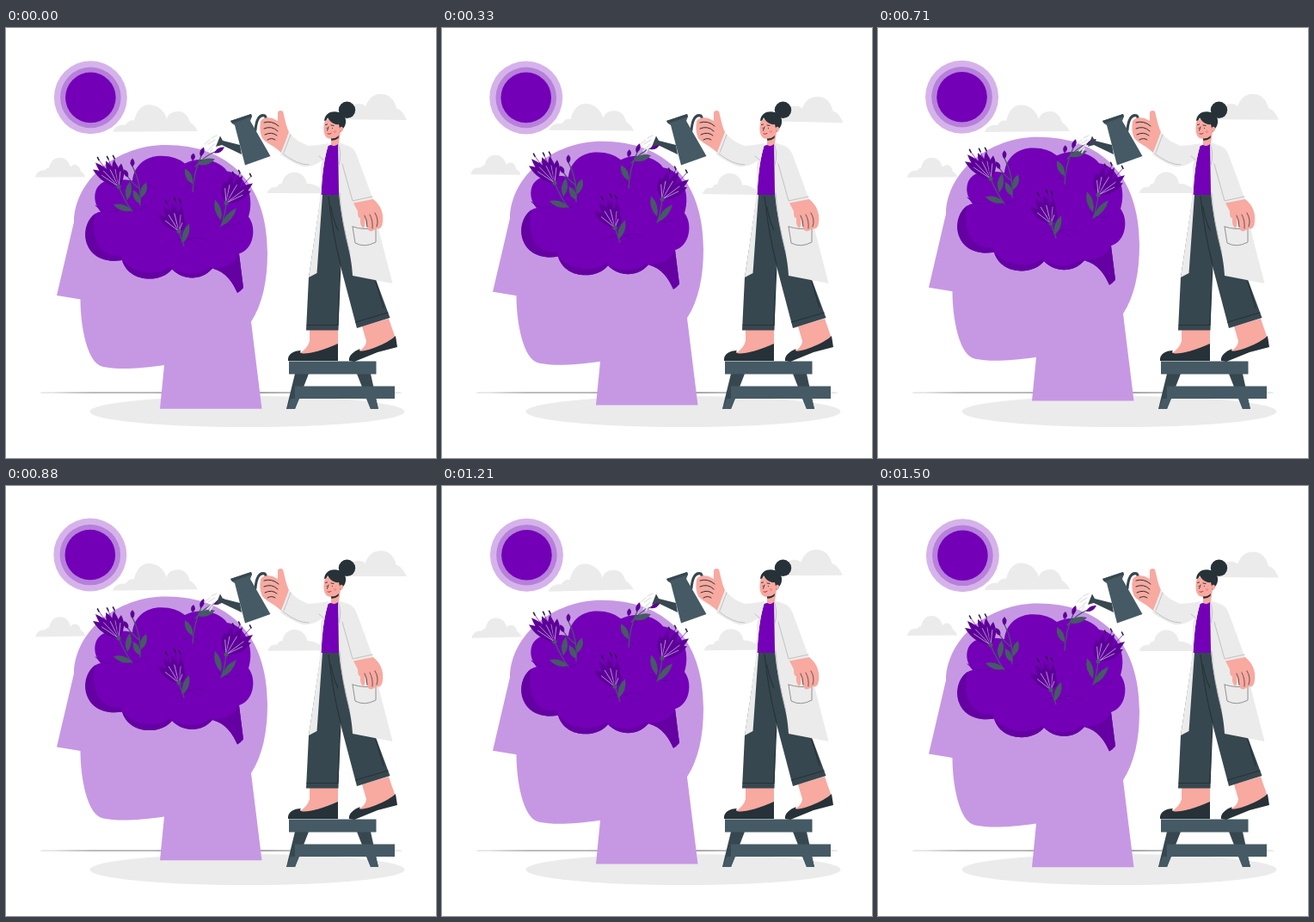
An HTML page for the animation above (1540 ms loop, 500 by 500 pixels).

```html
<!DOCTYPE html>
<html lang="en">
<head>
<meta charset="utf-8">
<title>Growing mind</title>
<style>
  html, body { margin: 0; height: 100%; overflow: hidden; background: #fff; }
  svg { display: block; width: 100%; height: 100%; }
  .line { fill: none; stroke-linecap: round; stroke-linejoin: round; }
</style>
</head>
<body>
<svg viewBox="0 0 500 500">
  <g id="clouds" fill="#ebebeb">
    <path d="M34 174C35 169 39 165 45 166Q48 163 50 163C52 155 56 151 62 151C69 151 73 155 75 162C78 158 85 158 87 167Q91 169 92 173.500Z"/>
    <path d="M124 121C126 115 132 112 139 113C143 107 147 107 149 108C152 96 158 89.500 166 89.500C176 89.500 184 96 187 106C188 100 194 97 200 97C208 97 212 103 214 110C218 112 221 116 223 120Z"/>
    <path d="M304 192C305 187 310 184 315 185C317 181 319 180 321 181C322 173 328 167.500 335 167.500C343 167.500 349 173 350 181C356 180 366 184 371 192Z"/>
    <path d="M390 106C395 95 403 87 411 88Q416 88 418 91C421 82 427 76.500 436 76.500C446 76.500 452 84 454 93C460 95 463 100 466 106.500Z"/>
  </g>
  <ellipse cx="250" cy="424" rx="211" ry=".9" fill="#a6a6a6"/>
  <ellipse cx="280.500" cy="446" rx="183" ry="18" fill="#ebebeb"/>

  <g id="sun">
    <circle r="42.500" fill="#d5b3ea"/>
    <circle r="35.300" fill="#b680db"/>
    <circle r="29.300" fill="#7300b7"/>
  </g>

  <g id="head">
    <path fill="#c698e3" d="M59 311.500L79 226C80 177 129 136.600 186 136.600C258 136.600 304 180 304 262C304 295 298 322 285 342L297.500 443.300H179L184 392.500C150 397.500 128 397.500 113 394.500C94 391 86.500 346 86.500 316Z"/>
    <path fill="#7300b7" d="M110 214C100 203 101 184 115 179Q130 175 147 178C149 160 163 149.300 180 149.300Q197 149 208 158C225 149.500 248 154 257 167C277 169 290 195 282 220C292 233 288 258 271 263L276 302.500Q272 307 269 308.500C264 297 256 284 240 280C228 294.500 206 294.500 193 281C180 297.500 143 297 135 270.500C112 275 92 260 92.500 240C93 226 100 216 110 214Z"/>
    <g fill="#6500a3">
      <path d="M104 216C82 232 90 278 135 270.500L134 265C112 268 97 249 104 216Z"/>
      <path d="M135 270.500C143 297 180 297.500 193 281L192 277C178 290 150 287 135 270.500Z"/>
      <path d="M193 281C206 294.500 228 294.500 240 280L238 278C226 288 208 288 193 281Z"/>
      <path d="M240 280C256 284 264 297 269 308.500Q272 307 276 302.500L271 263Q264 279 240 280Z"/>
    </g>
    <path class="line" stroke="#6500a3" d="M104 207Q115 219 132 212M130 208Q146 221 163 207M206 187Q217 180 226 192M191 250Q211 240 225 253M212 246Q225 241 236 249M243 222Q256 236 272 227"/>
    <g id="plants"></g>
  </g>

  <path class="line" stroke="#e6e6e6" stroke-width="1.500" d="M245 125L239 128M243 130L235 135M242 135L234 143M237 130L231 135M240 140L237 145"/>

  <g id="stool">
    <path fill="#37474f" d="M336 402H352L336 443H326ZM408 402H424L433 443H424Z"/>
    <path fill="#455a64" d="M329 387.500H430.500V402.500H329ZM336 416.500H452V431H336ZM331 431L326 443H336L341 431ZM419 431H430L433 443H424Z"/>
  </g>

  <g id="can">
    <path class="line" stroke="#37474f" stroke-width="3" d="M290 119C291 106 295 100 301 102Q304 106 303 114"/>
    <path fill="#37474f" d="M272 136L252 131L249 125.500L244 138L251 136L274 147Z"/>
    <path fill="#455a64" d="M261 108L285 100L286 103L284 108L307.500 149L278 159.500L266 113L263 111Z"/>
    <path fill="#37474f" d="M261 108L285 100L286 103L263 111Z"/>
  </g>

  <g id="woman">
    <g fill="#f8a9a0">
      <path d="M353 350H386V370Q362 382 340 379Q351 373 353 364Z"/>
      <path d="M414 347L445 338L453 361Q430 378 405 379Q419 372 419 364Z"/>
      <path d="M296 109C297 105 304 103 310 105L316 108L316 98Q318 94.500 322 97C324 104 325 112 329 121L321 146C314 138 302 134 298 128Q294 120 296 109Z"/>
    </g>
    <path class="line" stroke="#263238" d="M300 110Q309 107 317 114M300 117Q309 113 316 120M301 124Q309 120 315 125M304 130Q309 127 313 130"/>
    <path fill="#263238" d="M328 387C327 379 335 375 343 375C337 382 363 378 386 367V387ZM399 387C398 381 404 376 412 373C405 381 440 370 453 358L455 371L432 377L405 388Z"/>
    <path fill="#37474f" d="M367 190L352 290L349 351.500H386.500L388.500 275L408 349L446.500 337L392 190Z"/>
    <path class="line" stroke="#263238" stroke-width="1.200" d="M375 196Q380 240 389 275L386 345M350 345.500H386M406.500 342L444 331M378 208Q380 222 386 235M430 295L439 325"/>

    <path fill="#7300b7" d="M374.500 137L387 133L389 194H366.500Q368 158 374.500 137Z"/>
    <g fill="#ebebeb">
      <path d="M372 138L366 160Q367 190 363 215L352 290L361.500 285L368 194H366.500Q368 158 374.500 137Z"/>
      <path d="M386 133L398 137Q405 139 409 151L427 200L433 233L449.500 297L403 288C402 260 389 225 387 190Z"/>
      <path d="M319 147L329 121C335 129 343 134 352 137Q366 136 375 134L370 152C362 159 352 162 345 161C335 158 326 152 319 147Z"/>
    </g>
    <path class="line" stroke="#bdbdbd" stroke-width=".9" d="M322 146Q338 159 352 159M331 124L323 145M364 149L370 154M386 134Q391 145 387 160M391 158L403 201L426 196M388 192Q390 225 400 262"/>
    <path class="line" stroke="#929292" d="M403 231L406 250Q417 256 430 249L430 233Q416 235 403 231"/>
    <path fill="#f8a9a0" d="M404 203.500L427 199C437 207 440 218 437.500 229Q435 235 431 233L426 236Q421 238 419 229L417 221Q418 232 415 233Q411 228 412 221Q409 222 409 213Z"/>
    <path class="line" stroke="#263238" stroke-width=".7" d="M417 218Q420 223 420 231M423 217Q427 224 426 233M429 215Q434 223 431 231"/>

    <path fill="#f8a9a0" d="M371 107C368 117 369 129 378 129V136Q383 139 387 134L389 121Q393 119 391 113L384 104Z"/>
    <path fill="#263238" d="M370 108C371 98 380 96 387 98C394 100 397 107 394 114Q391 119 389 121L387 112C381 113 376 108 374 104Q373 108 370 108ZM378 128.500Q383 129 387 125L386.500 128Q382 131.500 378 130.500Z"/>
    <ellipse cx="390" cy="117.500" rx="2" ry="2.800" fill="#f8a9a0"/>
    <circle cx="396.500" cy="95.300" r="9.700" fill="#263238"/>
    <path class="line" stroke="#263238" stroke-width=".9" d="M373 116.300V116.500M379.500 116.500V116.700M371.500 112.500L373.500 112M378 113L381 113.500M375 115L373.500 119.300"/>
    <path class="line" stroke="#b5343c" d="M374 123Q376 124 378 122.500"/>
    <circle cx="382.500" cy="120.500" r="1.700" fill="#f28f86"/>
  </g>
</svg>
<script>
const byId = id => document.getElementById(id);
const PETAL = '#5d0098', LEAF = '#455a64', INK = '#2d2340', PALE = '#e3c9f2';

const stroke = (d, color, width = 1) =>
  `<path class="line" d="${d}" stroke="${color}" stroke-width="${width}"/>`;

// Pointed blade between two points, used for leaves, buds and petals.
function blade(x1, y1, x2, y2, width, color) {
  const mx = (x1 + x2) / 2, my = (y1 + y2) / 2;
  const len = Math.hypot(x2 - x1, y2 - y1);
  const nx = (y1 - y2) / len * width, ny = (x2 - x1) / len * width;
  return `<path fill="${color}" d="M${x1} ${y1}Q${mx + nx} ${my + ny} ${x2} ${y2}Q${mx - nx} ${my - ny} ${x1} ${y1}Z"/>`;
}
const leaf = (...p) => blade(...p, 7, LEAF);
const bud = (...p) => blade(...p, 5, PETAL);
const stem = d => stroke(d, LEAF, 1.2);

function flower(x, y, petals, stamens) {
  return petals.map(([px, py]) => blade(x, y, px, py, 9, PETAL)).join('') +
    petals.map(([px, py]) =>
      stroke(`M${x} ${y}L${x + (px - x) * .65} ${y + (py - y) * .65}`, PALE, .7)).join('') +
    stamens.map(([sx, sy]) =>
      stroke(`M${x} ${y}L${sx} ${sy}`, PETAL, .7) +
      stroke(`M${sx} ${sy}l-1.500 -3`, INK, 1.6)).join('') +
    `<circle cx="${x}" cy="${y}" r="2.500" fill="${LEAF}"/>`;
}

byId('plants').innerHTML = [
  stem('M131 185Q138 202 147 214'),
  leaf(141, 201, 144, 179), leaf(147, 213, 125, 206),
  flower(131, 185, [[101, 165], [104, 157], [116, 155], [125, 154], [134, 158]],
    [[108, 154], [119, 153], [126, 152]]),

  stem('M156 207Q158 182 147 161M155 187Q147 182 140 171'),
  leaf(157, 198, 163, 180), leaf(156, 205, 148, 189),
  bud(147, 162, 147, 152), bud(142, 174, 137, 165),

  stem('M217 191Q218 168 228 147M220 162Q231 149 244 144'),
  leaf(217, 182, 208, 164), leaf(222, 159, 243, 153),
  bud(226, 150, 230, 139), bud(242, 146, 254, 139), bud(217, 155, 218, 146),

  stem('M256 203Q255 218 250 231'),
  leaf(250, 224, 243, 200), leaf(250, 231, 268, 210),
  flower(256, 204, [[254, 178], [262, 172], [275, 172], [287, 181], [285, 190]],
    [[265, 171], [272, 169], [285, 173]]),

  stem('M201 237L207 254'),
  leaf(205, 251, 213, 228),
  flower(201, 237, [[177, 218], [183, 208], [193, 205], [204, 208], [207, 222]],
    [[187, 204], [197, 201], [203, 203]])
].join('');

const LOOP = 1540, STEPS = 37;

// Triangle wave: 0 at the ends of the cycle, 1 in the middle.
const triangle = p => 1 - Math.abs(1 - 2 * (p - Math.floor(p)));

function render(now) {
  const step = Math.floor((now % LOOP) * .024 + .1) % STEPS;
  const p = (step + 1) / STEPS;
  const sway = 2 * triangle(p + .25) - 1;
  const spin = p * 2 * Math.PI + .6;
  byId('head').setAttribute('transform', `translate(0 ${-10 * triangle(p)})`);
  byId('clouds').setAttribute('transform', `rotate(${sway} 250 134)`);
  byId('sun').setAttribute('transform',
    `translate(${98 + .5 * Math.cos(spin)} ${80.5 + .5 * Math.sin(spin)})`);
}

const start = performance.now();
function tick() {
  render(performance.now() - start);
  requestAnimationFrame(tick);
}
tick();
</script>
</body>
</html>
```
